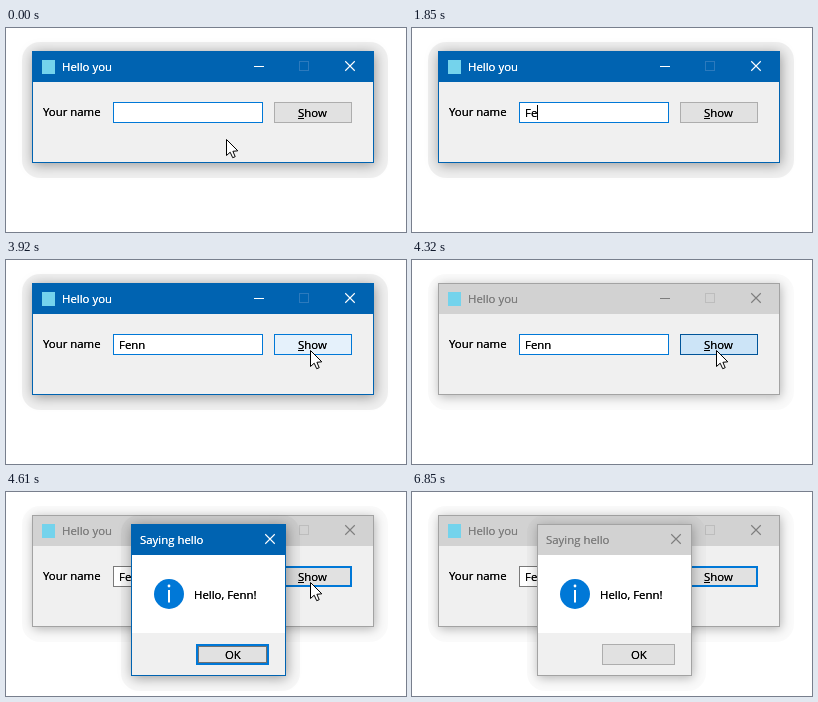
Write an HTML page with a canvas that moves like this. It is 400x204 px and loops after 6.95 s.

```html
<!DOCTYPE html>
<html lang="en">
<head>
<meta charset="utf-8">
<title>Hello you</title>
<style>
html, body { margin: 0; width: 100%; height: 100%; overflow: hidden; background: #fff; }
canvas { display: block; width: 400px; height: 204px; }
</style>
</head>
<body>
<canvas id="stage" width="400" height="204"></canvas>
<script>
const ctx = document.getElementById('stage').getContext('2d');
const LOOP = 6950;
const NAME = 'Fenn';
const BLUE = '#0063b1', ACCENT = '#0078d7', FACE = '#f0f0f0';

// Key moments in ms
const KEYS = [1200, 1330, 2410, 2810];
const ENTER = 3240, HOVER = 3660, PRESS = 4060, BLUR = 4320;
const OPEN = 4470, EXIT = 5838, GONE = 6550, DISMISS = 6850;
const TICK = 130, BLINK = 6 * TICK;

const clamp = v => Math.max(0, Math.min(1, v));
const lerp = (a, b, s) => a + (b - a) * s;

// Rises from 0 to 1 in two hard steps.
const ramp = (t, start) => clamp((Math.floor((t - start) / TICK) + 1) / 2);

function mix(a, b, s) {
  return `rgb(${a.map((v, i) => Math.round(lerp(v, b[i], s)))})`;
}

// Fades in for one tick, stays for two, fades out for one, rests for two.
function caretAlpha(t) {
  if (t >= BLUR) return 0;
  const p = (t - 140 + BLINK) % BLINK;
  return ramp(p, 0) - ramp(p, 3 * TICK);
}

function pointerAt(t) {
  if (t < KEYS[0]) return [220, 111];
  if (t < ENTER || t >= GONE) return null;
  if (t < EXIT) {
    const s = clamp(Math.floor((t - ENTER) / 135) / 3);
    const eased = Math.sin(s * Math.PI / 2);
    return [lerp(232, 304, eased), lerp(112, 90, eased)];
  }
  const s = clamp(Math.floor((t - EXIT) / 142) / 4);
  const eased = s + 1.25 * s ** 3 * (1 - s);
  return [lerp(304, 358, eased), lerp(90, 203, eased)];
}

function rect(x, y, w, h, color) {
  ctx.fillStyle = color;
  ctx.fillRect(x, y, w, h);
}

function box(x, y, w, h, fill, border, line = 1) {
  rect(x, y, w, h, border);
  rect(x + line, y + line, w - 2 * line, h - 2 * line, fill);
}

// Two passes give the crisp, dark strokes of hinted text.
function text(str, x, y, color = '#000') {
  ctx.font = '11.4px "Open Sans", "Noto Sans", sans-serif';
  ctx.fillStyle = color;
  ctx.fillText(str, x, y);
  ctx.fillText(str, x, y);
}

function disc(x, y, r, color) {
  ctx.fillStyle = color;
  ctx.beginPath();
  ctx.arc(x, y, r, 0, 2 * Math.PI);
  ctx.fill();
}

function cross(x, y, color) {
  ctx.strokeStyle = color;
  ctx.lineWidth = 1.1;
  ctx.beginPath();
  ctx.moveTo(x, y);
  ctx.lineTo(x + 9.5, y + 9.5);
  ctx.moveTo(x + 9.5, y);
  ctx.lineTo(x, y + 9.5);
  ctx.stroke();
}

function frame(x, y, w, h, active, halo, body) {
  ctx.fillStyle = `rgba(0,0,0,${active ? halo : .018})`;
  ctx.beginPath();
  ctx.roundRect(x - 10, y - 9, w + 24, h + 24, 18);
  ctx.fill();
  ctx.save();
  ctx.shadowColor = `rgba(0,0,0,${active ? .38 : .28})`;
  ctx.shadowBlur = active ? 12 : 10;
  ctx.shadowOffsetX = 1;
  ctx.shadowOffsetY = 2;
  rect(x, y, w, h, '#999');
  ctx.restore();
  box(x, y, w, h, body, active ? BLUE : '#a3a3a3');
  rect(x + 1, y + 1, w - 2, 30, active ? BLUE : '#d2d2d2');
}

function showButton(t) {
  const hover = ramp(t, HOVER), press = ramp(t, PRESS);
  const open = t >= OPEN;
  const fill = press
    ? mix([229, 241, 251], [204, 228, 247], press)
    : mix([225, 225, 225], [229, 241, 251], hover);
  const border = press
    ? mix([0, 120, 215], [0, 84, 153], press)
    : mix([173, 173, 173], [0, 120, 215], hover);
  box(268, 74, 78, 21, open ? '#e1e1e1' : fill, open ? ACCENT : border, open ? 2 : 1);
  text('Show', 292, 89);
  rect(292, 90, 6, 1, '#000');
}

function mainWindow(t) {
  const active = t < BLUR;
  const ink = active ? '#fff' : '#7d7d7d';
  frame(26, 23, 342, 112, active, .058, FACE);
  rect(36, 32, 13, 14, '#74d3ec');
  text('Hello you', 56, 43, ink);
  rect(248, 38, 10, 1, ink);
  ctx.strokeStyle = active ? '#2c7abd' : '#bdbdbd';
  ctx.lineWidth = 1;
  ctx.strokeRect(293.5, 33.5, 9, 9);
  cross(339.25, 33.25, ink);

  text('Your name', 37, 88);
  box(107, 74, 150, 21, '#fff', t < OPEN ? ACCENT : '#7a7a7a');
  const value = NAME.slice(0, KEYS.filter(key => key <= t).length);
  text(value, 113, 89);
  const caretX = Math.round(113 + ctx.measureText(value).width);
  rect(caretX, 77, 1, 15, `rgba(0,0,0,${caretAlpha(t)})`);
  showButton(t);
}

function infoIcon() {
  disc(163, 102, 15, ACCENT);
  disc(163, 94, 1.4, '#fff');
  rect(162, 98, 2, 12.5, '#fff');
}

function dialog(t) {
  if (t < OPEN) return;
  const active = t < DISMISS;
  const ink = active ? '#fff' : '#7d7d7d';
  ctx.globalAlpha = ramp(t, OPEN);
  frame(125, 32, 155, 152, active, .03, '#fff');
  text('Saying hello', 134, 52, ink);
  cross(259.25, 42.25, ink);
  infoIcon();
  text(`Hello, ${NAME}!`, 188, 107);
  rect(126, 141, 153, 42, FACE);
  box(190, 152, 73, 21, '#e1e1e1', active ? ACCENT : '#adadad', active ? 2 : 1);
  if (active) {
    ctx.strokeStyle = '#000';
    ctx.lineWidth = 1;
    ctx.setLineDash([1, 1]);
    ctx.strokeRect(192.5, 154.5, 68, 16);
    ctx.setLineDash([]);
  }
  text('OK', 219, 167);
  ctx.globalAlpha = 1;
}

function pointer(t) {
  const pos = pointerAt(t);
  if (!pos) return;
  ctx.save();
  ctx.translate(Math.round(pos[0]) + .5, Math.round(pos[1]) + .5);
  const arrow = new Path2D('M0 0V16L3.7 12.7 6.2 18.2 8.7 17.2 6.4 11.8 11.3 11.3Z');
  ctx.fillStyle = '#fff';
  ctx.strokeStyle = '#000';
  ctx.lineWidth = 1;
  ctx.fill(arrow);
  ctx.stroke(arrow);
  ctx.restore();
}

function draw(t) {
  rect(0, 0, 400, 204, '#fff');
  mainWindow(t);
  dialog(t);
  pointer(t);
}

const start = performance.now();
function tick() {
  draw((performance.now() - start) % LOOP);
  requestAnimationFrame(tick);
}
tick();
</script>
</body>
</html>
```
